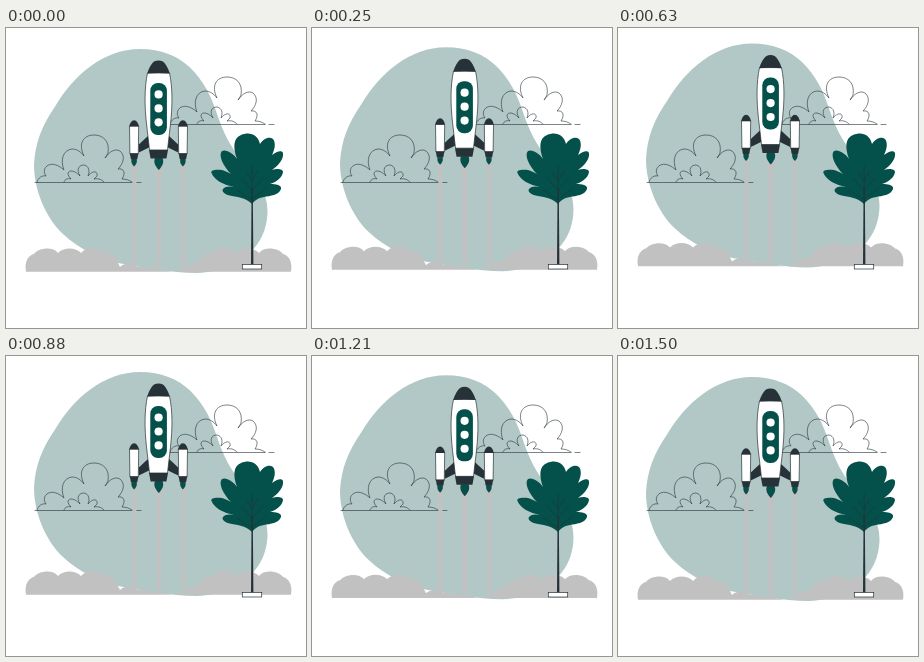
An HTML page that plays this animation: 300x300 px, repeating every 1540 ms.

```html
<!DOCTYPE html>
<html lang="en">
<head>
<meta charset="utf-8">
<title>Rocket launch</title>
<style>
  html, body { margin: 0; width: 100%; height: 100%; overflow: hidden; background: #fff; }
  svg { display: block; width: 100vw; height: 100vh; }
  .sky { fill: #b2c8c6; }
  .smoke { fill: #c1c1c1; }
  .dark { fill: #263238; }
  .green { fill: #04504a; }
  .white { fill: #fff; }
  .hull { fill: #fff; stroke: #263238; stroke-width: .7; }
  .line { fill: none; stroke: #263238; stroke-width: .6; stroke-linejoin: round; stroke-linecap: round; }
</style>
</head>
<body>
<svg viewBox="0 0 300 300">
  <defs>
    <g id="cloud" class="line">
      <path d="M29 154.5H126M130 154.5H135"/>
      <path d="M31 154C32 150 36 147 40 148C35 141 42 134 50 137C53 138 56 140 58 142C54 132 57 122 66 121C71 121 75 124 78 128C72 116 77 107 88 107C97 107 104 113 102 125C101 127 100 129 99 130C103 124 109 120 114 123C120 128 117 136 112 141C118 140 120 145 116 151C120 151 123 152 126 154"/>
      <path d="M58 154C59 151 62 150 65 151C59 145 63 141 69 144C71 145 72 146 74 148C70 141 73 137 78 137C83 138 84 143 82 148C87 142 92 143 91 148L88 151C93 150 96 152 98 154"/>
    </g>
    <g id="booster">
      <path class="smoke" d="M124.5 132H132C131.5 137 130.4 139 130.4 143V239H126.6V143C126.6 139 125 137 124.5 132Z"/>
      <path class="green" d="M125.6 131H130.6C131.6 134 130 136.5 128.1 138.5C126.2 136.5 124.6 134 125.6 131Z"/>
      <path class="hull" d="M123.5 98H132.7L132.3 126H123.9Z"/>
      <path class="dark" d="M123.2 98.6C123.8 95 125.5 92.4 128.1 92.2C130.7 92.4 132.4 95 133 98.6Z"/>
      <path class="dark" d="M123.8 125.2H132.4L131.3 131.3H124.9Z"/>
    </g>
  </defs>

  <g class="lift">
    <path class="sky" d="M134 21C155 21 172 28 184 39.5C198 53 206 70 211 86C217 104 224 118 236 133C249 149 262 163 261.5 184C261 205 251 221 237 230C222 240 205 245 190 245C165 244.5 138 240 112 235C96 231 74 222 57 206C39 189 28 161 28 137C29 115 36 97 50 77C68 47 98 21 134 21Z"/>
  </g>

  <use href="#cloud"/>
  <use href="#cloud" x="133" y="-58"/>

  <g class="lift">
    <path class="smoke" d="M147.5 132H158C158 140 154.8 145 154.8 151V240H150.7V151C150.7 145 147.5 140 147.5 132Z"/>
    <path class="smoke" d="M20 243.7C18 233 23 227 28 226C32 220 47 218 52 225C57 219 70 219 75 225C81 218 94 219 98 225C105 224 110 229 112 235L114 239C118 235 124 235 128 238C139 239 152 241 166 243.7Z"/>
    <path class="smoke" d="M285 243.7C287 233 282 227 277 226C273 220 258 218 253 225C248 219 235 219 230 225C224 218 211 219 207 225C200 224 195 229 193 234C188 234 180 239 170 243.7Z"/>

    <use href="#booster"/>
    <use href="#booster" x="48.8"/>
    <path class="dark" d="M143 107L132.8 116.5V124.5L145 118.5Z"/>
    <path class="dark" d="M162 107L172.2 116.5V124.5L160 118.5Z"/>
    <path class="green" d="M149 130H156.5C158.5 134.5 156 138.5 152.8 142C149.6 138.5 147 134.5 149 130Z"/>
    <path class="hull" d="M141.5 45C138.3 60 138.5 78 140.5 96L143.5 122H161.5L164.5 96C166.5 78 166.7 60 163.5 45Z"/>
    <path class="dark" d="M141.2 45.6C143 40 145.3 36 148 33.6Q152.5 31.4 157 33.6C159.7 36 162 40 163.8 45.6Q152.5 44.6 141.2 45.6Z"/>
    <path class="dark" d="M143 122H162L160.4 130.5H144.6Z"/>
    <rect class="green" x="144.3" y="55" width="16.6" height="52" rx="7.6"/>
    <circle class="white" cx="152.6" cy="66.5" r="4.1"/>
    <circle class="white" cx="152.6" cy="80.5" r="4.1"/>
    <circle class="white" cx="152.6" cy="94.4" r="4.1"/>
  </g>

  <path class="green" d="M246 176C241 171 234 169 226 168C220 167 215 164 217 161C219 158 224 158 228 159C218 157 208 152 205.5 145C204 142 210 141 216 142C219 143 222 144 225 146C217 138 212 127 216 123C220 121 227 125 231 131C227 120 227 110 235 107C244 103 252 107 254 116C257 111 263 108 267 111C270 115 269 121 266 127C271 123 276 122 277 125C278 131 272 138 266 142C271 140 277 141 277 144C276 150 270 154 264 156C270 156 276 157 275 161C273 167 264 168 258 169C252 170 248 173 246 176Z"/>
  <path class="line" d="M246.2 170V138M246.2 153L240 144M246.2 152L252 143M246.2 163L236 151M246.2 162L257 150M246.2 172L231 162M246.2 171L261 160"/>
  <path class="dark" d="M245.6 160H246.8L247.4 237H245Z"/>
  <rect class="hull" x="236.3" y="236.4" width="19.4" height="4.6"/>
</svg>
<script>
  const LOOP = 1540, RISE = 5.6, LEAD = 50;
  const parts = document.querySelectorAll('.lift');

  function draw(ms) {
    const phase = (ms + LEAD) / LOOP * 2 * Math.PI;
    const y = -RISE * (1 - Math.cos(phase)) / 2;
    parts.forEach(p => p.setAttribute('transform', `translate(0 ${y.toFixed(3)})`));
  }

  const start = performance.now();
  function tick() {
    draw(performance.now() - start);
    requestAnimationFrame(tick);
  }
  tick();
</script>
</body>
</html>
```
